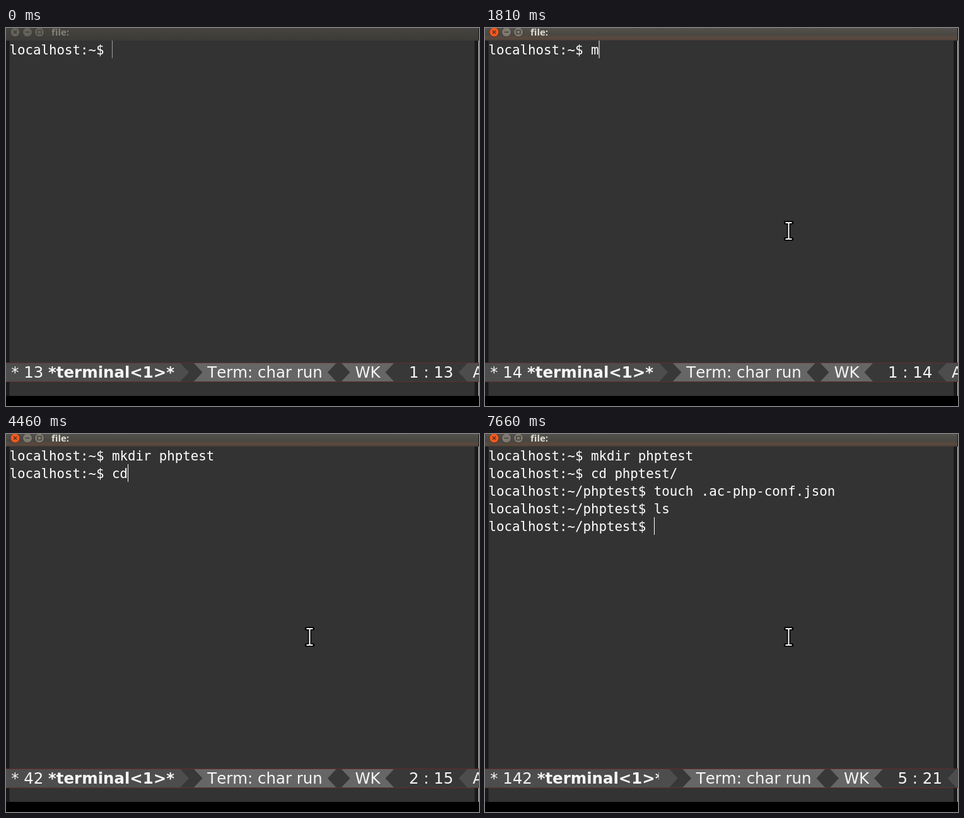
Recreate the animation shown at these times as an HTML page. Size 750 by 600 pixels, loop 8 s.

```html
<!DOCTYPE html>
<html lang="en">
<head>
<meta charset="utf-8">
<title>Terminal</title>
<style>
  html, body { margin: 0; width: 100%; height: 100%; overflow: hidden; background: #000; }
  svg { display: block; width: 750px; height: 600px; }
  text { white-space: pre; font-kerning: none; }
  .term { font: 20.762px "DejaVu Sans Mono", monospace; fill: #fff; }
  .mode { font: 24.45px "DejaVu Sans", sans-serif; fill: #f6f6f6; }
  .title { font: bold 15px "Open Sans", sans-serif; }
</style>
</head>
<body>
<svg viewBox="0 0 750 600">
  <defs>
    <linearGradient id="idle" x2="0" y2="1">
      <stop stop-color="#45443f"/><stop offset="1" stop-color="#3c3b37"/>
    </linearGradient>
    <linearGradient id="active" x2="0" y2="1">
      <stop stop-color="#53514b"/><stop offset=".55" stop-color="#494742"/>
      <stop offset=".7" stop-color="#57483e"/><stop offset=".9" stop-color="#59483d"/>
      <stop offset="1" stop-color="#3c3835"/>
    </linearGradient>
  </defs>

  <rect width="750" height="600"/>
  <rect width="750" height="584" fill="#1a1a1a"/>
  <rect x="5.5" y="20" width="737.5" height="564" fill="#333"/>
  <path d="M749.5 20V584" stroke="#ccc"/>

  <g id="idleBar"></g>
  <g id="activeBar"></g>

  <g id="lines" class="term"></g>
  <rect id="caret" width="1" height="28"/>

  <g class="mode">
    <rect y="531" width="750" height="31" fill="#383838"/>
    <rect y="531" width="276" height="31" fill="#4d4d4d"/>
    <text x="8.2" y="555">* <tspan id="point"></tspan> <tspan font-weight="bold">*terminal&lt;1&gt;*</tspan></text>
    <g id="rest">
      <path d="M275 531H275.5L290 546.5L275.5 562H275Z" fill="#4d4d4d"/>
      <path d="M297 531H524.5L510 546.5L524.5 562H297L311.5 546.5Z
               M531 531H616L601.5 546.5L616 562H531L545.5 546.5Z" fill="#666"/>
      <text x="319.3" y="555">Term: char run</text>
      <text x="553.4" y="555">WK</text>
      <text id="pos" x="639" y="555"></text>
      <g id="tail">
        <path d="M790 531H732.5L718 546.5L732.5 562H790Z" fill="#4d4d4d"/>
        <text x="740" y="555">A</text>
      </g>
    </g>
    <path id="fill" fill="#4d4d4d"/>
    <path d="M0 531.5H750M0 561.5H750" stroke="#642c2e"/>
  </g>

  <g id="trail"></g>
  <g fill="none" id="mouse" stroke-linejoin="round" transform="translate(.5)">
    <path id="beam" d="M476 309H480L481 310L482 309H486M481 310V334M476 335H480L481 334L482 335H486"
          stroke="#000" stroke-width="5.5" stroke-linecap="round"/>
    <path d="M476 309H480L481 310L482 309H486M481 310V334M476 335H480L481 334L482 335H486"
          stroke="#fff" stroke-width="2"/>
  </g>
</svg>
<script>
const LOOP = 8000, CHAR = 12.5, LEFT = 5.5, TOP = 20, ROW = 28;
const DIGIT = 15.55, SPACE = 7.77;
const HOME = 'localhost:~$ ', DIR = 'localhost:~/phptest$ ';
const $ = id => document.getElementById(id);
const show = (el, on) => { el.style.display = on ? '' : 'none'; };

// Title bar
function bar(fill, ink, close, button, rim, glyph) {
  const disc = (x, color, mark) =>
    `<circle cx="${x}" cy="6.5" r="7.5" fill="${color}" stroke="${rim}" stroke-width=".8"/>
     <path d="${mark}" fill="none" stroke="${glyph}" stroke-width="1.2"/>`;
  return `<rect width="749" height="20" fill="${fill}"/>` +
    disc(14.5, close, 'M12 4l5 5m0-5l-5 5') +
    disc(34, button, 'M30.5 6.5h7') +
    disc(53, button, 'M50 3.5h6v6h-6z') +
    `<text class="title" x="72" y="12" fill="${ink}">file:</text>`;
}
$('idleBar').innerHTML = bar('url(#idle)', '#85807a', '#65625b', '#65625b', '#35342f', '#3a3934');
$('activeBar').innerHTML = bar('url(#active)', '#e2ded6', '#f4581c', '#7d7a72', '#35322d', '#3a3229');

// Square trail left by the pointer
const path = [[726, 463], [625, 432], [588, 407], [565, 366], [536, 333], [497, 318], [466, 301], [456, 298]];
$('trail').innerHTML = path.map(([x, y]) => `<rect x="${x}" y="${y}" width="48" height="48"/>`).join('');
const squares = [...$('trail').children];

// Terminal output as [time, text] pairs
const output = [[0, HOME]];
const put = (time, text) => output.push([time, text]);
const type = (text, start, step) => [...text].forEach((c, i) => put(start + i * step, c));
put(1810, 'm');
type('kdir ', 1870, 85);
type('phpte', 2720, 90);
put(3290, 's');
put(3790, 't');
put(3970, '\n');
put(4020, HOME);
put(4320, 'c');
type('d ', 4460, 50);
type('php', 4650, 50);
type('te', 5220, 100);
put(5480, 'st/');
put(5810, '\n');
put(5860, DIR);
put(6270, 'touch .ac-php-conf.json');
put(7070, '\n');
put(7120, DIR);
type('ls', 7450, 50);
put(7660, '\n' + DIR);

const rows = Array.from({ length: 5 }, (_, i) => {
  const row = document.createElementNS('http://www.w3.org/2000/svg', 'text');
  row.setAttribute('x', LEFT);
  row.setAttribute('y', TOP + ROW * i + 22);
  return $('lines').appendChild(row);
});

let last;
function drawText(text) {
  if (text === last) return;
  last = text;
  const lines = text.split('\n');
  const row = lines.length - 1, col = lines[row].length;
  rows.forEach((el, i) => { el.textContent = lines[i] || ''; });
  $('caret').setAttribute('x', LEFT + CHAR * col);
  $('caret').setAttribute('y', TOP + ROW * row);
  const point = String(text.length);
  const shift = (point.length - 2) * DIGIT;
  $('point').textContent = point;
  $('pos').textContent = `${row + 1} : ${String(col).padStart(2)}`;
  $('rest').setAttribute('transform', `translate(${shift})`);
  $('fill').setAttribute('d', shift ? `M275.5 531h${shift}L${290 + shift} 546.5L${275.5 + shift} 562H275.5Z` : '');
  $('tail').setAttribute('transform', `translate(${col < 10 ? -SPACE : 0})`);
}

function draw(t) {
  drawText(output.filter(([time]) => time <= t).map(([, text]) => text).join(''));
  squares.forEach((el, i) => show(el, t >= 660 + 40 * i && t < 1010));
  show($('mouse'), t >= 1010);
  $('activeBar').setAttribute('opacity', t < 1010 ? 0 : t < 1060 ? 0.5 : 1);
  $('caret').setAttribute('fill', t < 1010 ? '#a0a0a0' : '#fff');
}

const start = performance.now();
function tick() {
  draw((performance.now() - start) % LOOP);
  requestAnimationFrame(tick);
}
draw(0);
requestAnimationFrame(tick);
</script>
</body>
</html>
```
